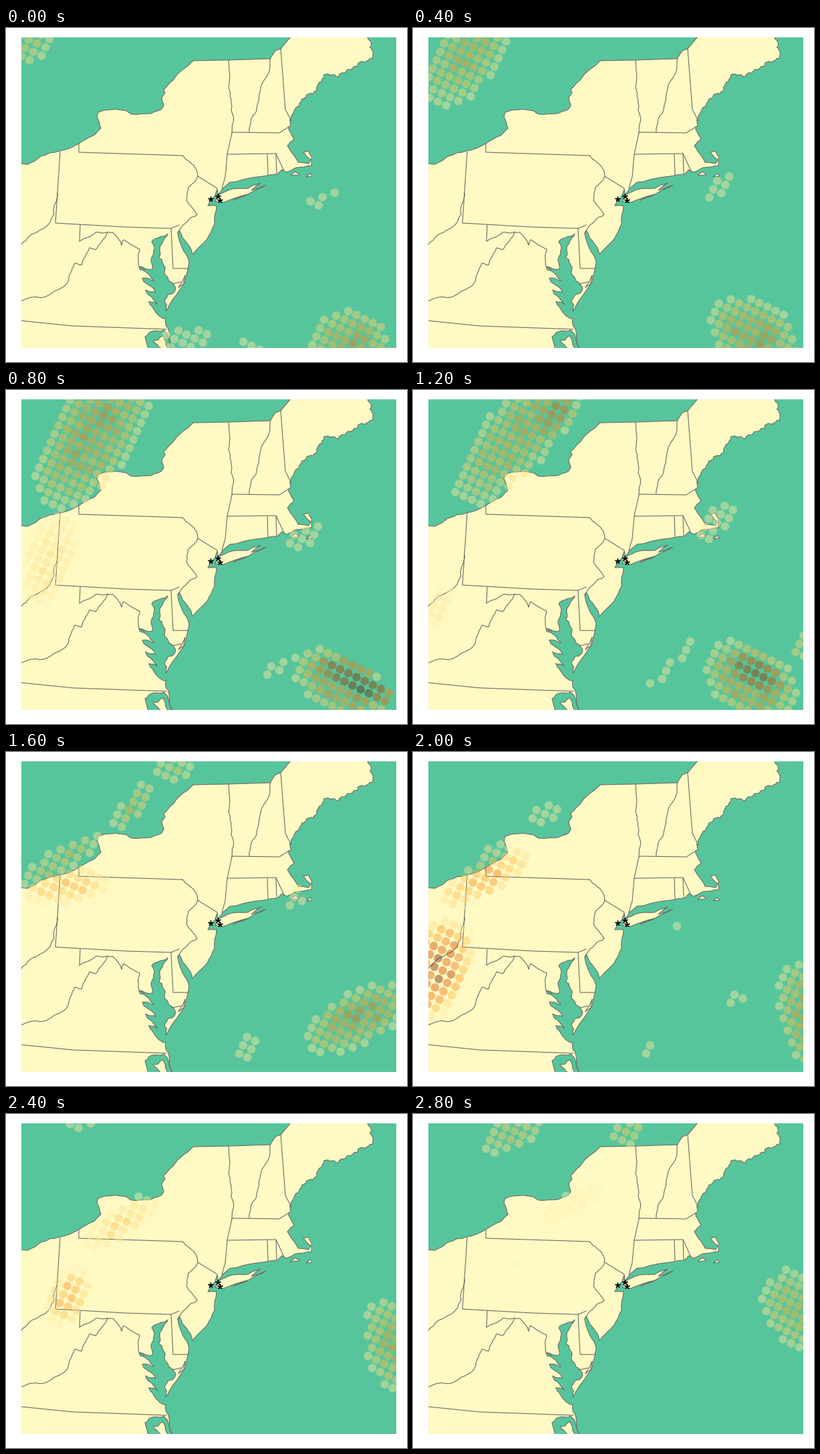
Write a matplotlib script that moves like this. It is 600 px wide and 500 px high and loops after 3.2 s.

```python
import numpy as np
import matplotlib.pyplot as plt
from matplotlib.animation import FuncAnimation
from matplotlib.patches import Polygon, Rectangle

W, H, DPI = 600, 500, 100
STEPS, STEP_MS = 8, 400
SEA, LAND, LINE = "#57c59b", "#fff9c3", "#6c6c6c"
X0, Y0, X1, Y1 = 23, 14, 584, 479

fig = plt.figure(figsize=(W / DPI, H / DPI), dpi=DPI, facecolor="white")
ax = fig.add_axes([0, 0, 1, 1])
ax.set_xlim(0, W)
ax.set_ylim(H, 0)
ax.axis("off")
box = Rectangle((X0, Y0), X1 - X0, Y1 - Y0, fc=SEA, lw=0)
ax.add_patch(box)


# ---------- map ----------
def rough(pts, amp=0.1, depth=2, seed=1):
    """Fractal midpoint displacement of a polyline."""
    rng = np.random.default_rng(seed)
    p = np.array(pts, float)
    for _ in range(depth):
        d = np.diff(p, axis=0)
        normal = np.column_stack([-d[:, 1], d[:, 0]])
        mid = p[:-1] + d / 2 + normal * rng.uniform(-amp, amp, (len(d), 1))
        out = np.empty((2 * len(p) - 1, 2))
        out[::2], out[1::2] = p, mid
        p = out
    return p


def line(pts):
    ln, = ax.plot(*np.array(pts, float).T, color=LINE, lw=0.8, zorder=3,
                  solid_joinstyle="round")
    ln.set_clip_path(box)


def area(pts, color, edge="none"):
    patch = Polygon(pts, closed=True, fc=color, ec=edge, lw=0.8, zorder=2)
    ax.add_patch(patch)
    patch.set_clip_path(box)


def inlets(top, bottom, n, reach):
    """Shore from top to bottom, cut by n slanting river mouths."""
    top, bottom = np.array(top, float), np.array(bottom, float)
    pts = []
    for k in range(n):
        base = top + (bottom - top) * k / n
        size = reach * (1 - 0.12 * k)
        pts += [base, base + (-size, -4), base + (-size + 2, 1),
                base + (-5, 8)]
    return pts + [bottom]


lakes = rough([
    (20, 203), (33, 204), (52, 192), (80, 184), (109, 173), (131, 161),
    (142, 150), (136, 133), (138, 126), (148, 123), (180, 124), (188, 129),
    (217, 128), (232, 122), (236, 116), (233, 104), (238, 97), (236, 92),
    (250, 78), (280, 49)], 0.06)
north = [(280, 49), (333, 48), (395, 46), (403, 34), (411, 31), (427, 12)]
maine = rough([
    (541, 12), (549, 45), (533, 50), (519, 61), (490, 70), (473, 76),
    (463, 95), (443, 106), (431, 124), (423, 152)], 0.24, 4, 6)
cape = rough([
    (423, 152), (431, 166), (421, 176), (432, 192), (437, 201), (453, 203),
    (456, 197), (445, 186), (452, 184), (457, 192), (457, 206), (434, 209),
    (420, 216), (413, 212), (406, 219), (375, 223), (335, 231), (317, 250),
    (316, 241), (313, 251), (302, 266), (315, 266)], 0.06, 2, 7)
jersey = rough([
    (315, 266), (312, 294), (301, 316), (279, 339), (276, 329), (264, 314),
    (259, 303), (257, 307), (264, 330), (274, 350), (268, 380), (243, 417),
    (239, 424)], 0.05, 2, 9)
bay_east = rough([
    (239, 424), (238, 406), (253, 387), (243, 376), (235, 353), (230, 331),
    (242, 308)], 0.2, 3, 5)
bay_west = rough(
    [(242, 308), (228, 314), (218, 320), (222, 330), (217, 346)]
    + inlets((219, 361), (229, 431), 4, 20)
    + [(239, 435), (244, 455), (250, 481)], 0.12, 2, 12)

coast = np.vstack([maine, cape, jersey, bay_east, bay_west])
area(np.vstack([lakes, north, coast, [(20, 481)]]), LAND)
for shore in (lakes, north, coast):
    line(shore)

sound = [(208, 462), (236, 452), (247, 481), (241, 481), (235, 461), (220, 468),
         (233, 481), (213, 481)]
area(rough(sound, 0.15, 3, 3), SEA, LINE)

islands = [
    [(313, 260), (317, 251), (332, 243), (362, 240), (381, 232), (367, 243),
     (389, 235), (362, 249), (326, 261), (313, 260)],
    [(340, 258), (362, 249), (340, 258)],
    [(426, 221), (433, 215), (439, 220), (426, 221)],
    [(449, 223), (456, 218), (458, 222), (449, 223)],
    [(258, 389), (268, 370), (266, 383), (258, 389)],
]
for k, isle in enumerate(islands):
    area(rough(isle, 0.05, 2, k), LAND, LINE)

rivers = [
    [(333, 48), (333, 90), (337, 112), (338, 157)],
    [(396, 46), (395, 60), (380, 95), (378, 109), (366, 140), (364, 156)],
    [(264, 191), (285, 212), (287, 222), (273, 238), (270, 258), (286, 279),
     (268, 293), (257, 307)],
    [(110, 319), (134, 306), (160, 306), (173, 325), (176, 317), (200, 331),
     (199, 357), (207, 362)],
    [(152, 305), (134, 332), (125, 329), (113, 355), (103, 352), (89, 385),
     (60, 402), (21, 409)],
    [(77, 247), (73, 264), (66, 291), (38, 309), (21, 326)],
]
for k, river in enumerate(rivers):
    line(rough(river, 0.09, 3, k + 20))

borders = [
    [(338, 157), (331, 189), (328, 223), (323, 240)],
    [(338, 156), (409, 157), (423, 148)],
    [(331, 189), (404, 188), (416, 214)],
    [(391, 189), (392, 220)],
    [(404, 189), (405, 218)],
    [(411, 31), (418, 122), (427, 139)],
    [(109, 173), (109, 186), (264, 191)],
    [(287, 222), (316, 240)],
    [(81, 185), (74, 292), (180, 298), (247, 300), (259, 295)],
    [(247, 300), (250, 360), (273, 360)],
    [(249, 383), (262, 380)],
    [(111, 295), (110, 319)],
    [(21, 438), (100, 446), (240, 451)],
]
for border in borders:
    line(border)

ax.plot([306, 317, 320], [256, 251.5, 258], ls="none", marker=(5, 2, 0),
        ms=5.8, mew=1, color="black", zorder=6)

# ---------- radar dots ----------
# Two slightly different lattices: origin, step along a row, step between rows.
WEST = np.array([(202, 49), (12.55, 5.8), (-5.76, 12.6)])
EAST = np.array([(500, 418), (12.2, 5.9), (-5.9, 12.36)])
I, J = np.meshgrid(np.arange(-20, 13), np.arange(-18, 30))
grain = np.random.default_rng(5).uniform(0.75, 1.25, I.shape)
SEA_RAIN, LAND_RAIN = 0.21, 0.14
storms = []


def storm(grid, base, keys):
    """Slanted ellipse on a lattice, moving linearly between key steps.

    Each key is step: (i, j, half width, half height, slant, peak).
    """
    storms.append((grid, base, keys))


def level(base, keys, k):
    """Rain level of every cell at step k, zero outside the ellipse."""
    steps = sorted(keys)
    if not steps[0] <= k <= steps[-1]:
        return np.zeros(I.shape)
    i, j, wide, high, slant, peak = (
        np.interp(k, steps, col) for col in zip(*(keys[s] for s in steps)))
    dj = J - j
    r2 = ((I - i - slant * dj) / wide) ** 2 + (dj / high) ** 2
    return np.where(r2 < 1, base + peak * grain * (1 - r2), 0)


# northwest: the lake streak, its core and what is left of it
storm(WEST, SEA_RAIN, {0: (-12.2, 3.5, 2.6, 3, -0.25, 0.15),
                       2: (-4.2, 3, 4.6, 9.5, -0.1, 0.32),
                       3: (-2.2, 2, 3.9, 10, -0.25, 0.28)})
storm(WEST, 0.34, {2: (-4.2, 1.5, 1.7, 3.5, -0.1, 0.26),
                   3: (0.2, -0.8, 1.8, 3.2, -0.2, 0.36)})
storm(WEST, SEA_RAIN, {4: (0.2, 2.4, 1.25, 3.2, -0.2, 0.2),
                       5: (1, 3, 1.5, 1.3, -0.3, 0)})
storm(WEST, SEA_RAIN, {4: (2.5, -3, 1.9, 1.6, -0.4, 0.1)})
storm(WEST, SEA_RAIN, {4: (-4.5, 11, 1.6, 4.4, -0.6, 0.16),
                       5: (-2.3, 9.2, 1.2, 1.9, -0.2, 0.05)})
storm(WEST, SEA_RAIN, {6: (-6.5, -1, 2, 2.2, -0.6, 0),
                       7: (-4.2, 0.5, 2.2, 2.9, -0.6, 0.14)})
storm(WEST, SEA_RAIN, {7: (7.2, -5, 1.45, 2, -0.45, 0.12)})

# rain over land
storm(WEST, LAND_RAIN, {2: (-2.8, 17.5, 2.6, 5.5, 0.1, 0.16),
                        3: (-2.5, 23, 1.4, 2.4, 0, 0.1)})
storm(WEST, LAND_RAIN, {4: (-3, 13.3, 3.6, 3, -0.9, 0.32),
                        5: (-2, 12, 2.4, 5, -0.6, 0.4),
                        7: (5, 4.5, 1.6, 3.2, -0.45, 0.02)})
storm(WEST, LAND_RAIN, {5: (-2.8, 23.2, 3.8, 6, 0, 0.72),
                        7: (2, 13, 0.6, 0.6, 0, 0.02)})

# off the cape
storm(EAST, SEA_RAIN, {0: (-7.1, -9.8, 0.9, 1.5, -0.7, 0),
                       2: (-9.9, -11.2, 1.3, 1.9, -0.4, 0),
                       3: (-10.1, -13, 1.4, 2.4, -0.3, 0),
                       4: (-10.9, -11.2, 1, 1.5, 0.2, 0),
                       5: (-12, -7, 0.5, 0.5, 0, 0)})

# southern stragglers
storm(EAST, SEA_RAIN, {0: (-14, 10.6, 2.4, 1.7, -1, 0)})
storm(EAST, SEA_RAIN, {0: (-7, 8.2, 1.2, 0.9, 0, 0)})
storm(EAST, SEA_RAIN, {2: (-6.25, 2.6, 0.6, 1.9, -0.45, 0),
                       3: (-7.75, 3, 0.6, 3.6, -0.33, 0),
                       4: (-8.5, 6, 0.9, 1.6, 0, 0),
                       5: (-9, 6.5, 0.5, 0.8, 0, 0)})
storm(EAST, SEA_RAIN, {5: (-2.7, -2.7, 0.9, 0.9, -0.5, 0)})

# ocean storm, its core and a neighbour
storm(EAST, SEA_RAIN, {0: (3, 3.5, 4.7, 4.5, 0, 0.32),
                       2: (1, 1.5, 6, 3.4, 0.2, 0.38),
                       3: (1, 1, 5.6, 4, 0.1, 0.38),
                       4: (1.2, -2.2, 3.4, 5.4, -0.55, 0.36),
                       5: (5.5, -4, 3.6, 5.3, 0.6, 0.3),
                       7: (0.8, -10.6, 4, 3.9, 0.25, 0.22)})
storm(EAST, 0.5, {2: (2, 0.5, 5, 1.7, 0.4, 0.5),
                  3: (1, 0, 3.4, 1.7, 0, 0.46)})
storm(EAST, SEA_RAIN, {3: (4.2, -4.8, 1.2, 1.6, 0, 0.12)})


def scene(k):
    xy, rain = [], []
    for grid in (WEST, EAST):
        wet = np.max([level(base, keys, k) for g, base, keys in storms
                      if g is grid], axis=0)
        on = wet > 0
        xy.append(grid[0] + I[on][:, None] * grid[1] + J[on][:, None] * grid[2])
        rain.append(wet[on])
    return np.vstack(xy), np.clip(np.concatenate(rain), 0, 1)


cmap = plt.get_cmap("YlOrBr")
dots = ax.scatter([], [], s=82, linewidths=0, zorder=4)
dots.set_clip_path(box)


def draw(k):
    xy, rain = scene(k)
    dots.set_offsets(xy)
    dots.set_facecolors(cmap(rain, alpha=0.45))
    return dots,


anim = FuncAnimation(fig, draw, frames=STEPS, interval=STEP_MS, repeat=True,
                     repeat_delay=0, blit=False)
plt.show()
```
